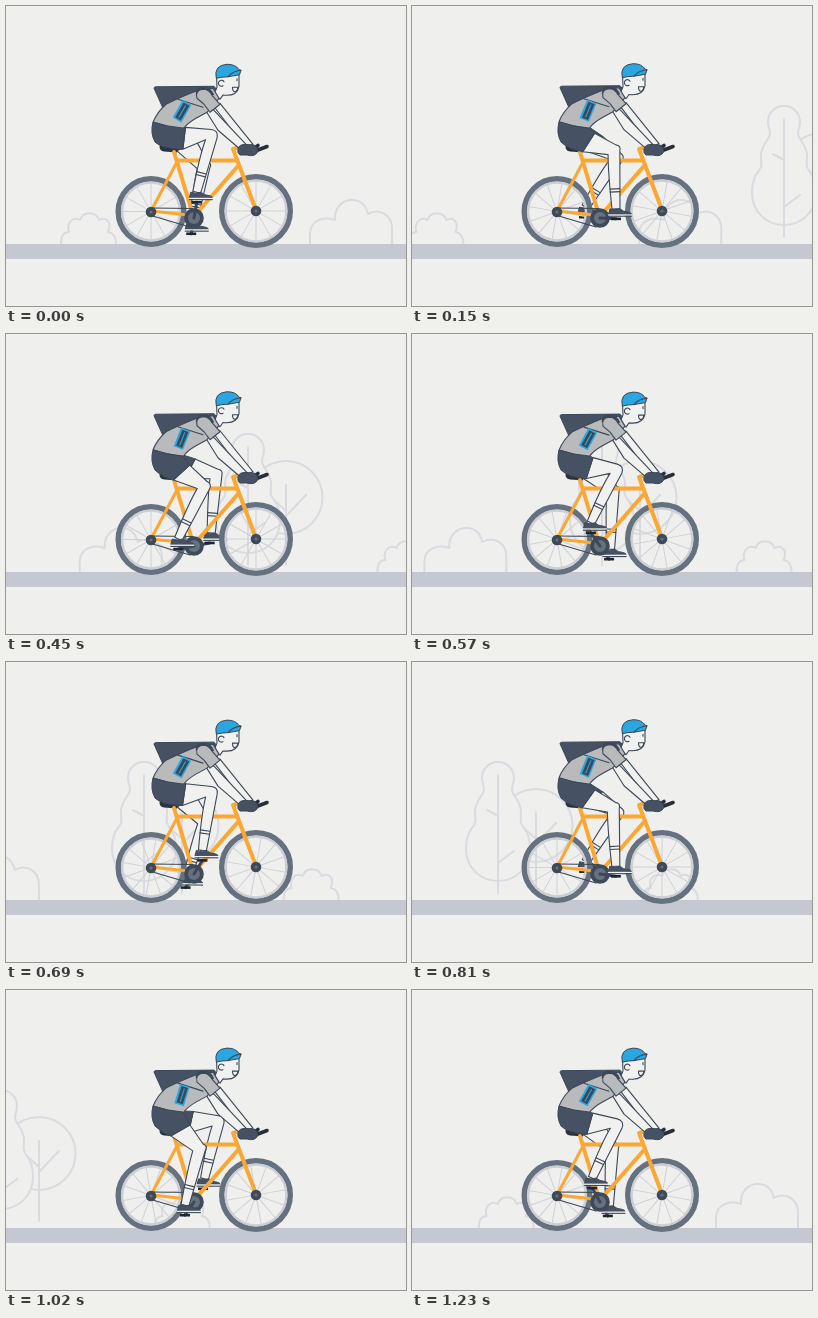
These frames come from a looping animation (400x300 px, 1260 ms). An HTML page:

```html
<!DOCTYPE html>
<html lang="en">
<head>
<meta charset="utf-8">
<title>Cyclist</title>
<style>
  html, body { margin: 0; width: 100%; height: 100%; overflow: hidden; background: #efefed; }
  svg { display: block; width: 100vw; height: 100vh; }
  .scene { fill: #efefed; stroke: #dadbe0; stroke-width: 2; stroke-linecap: round; stroke-linejoin: round; }
  .bare { fill: none; }
  .line { fill: none; stroke: #3c4857; stroke-width: 1.1; stroke-linecap: round; stroke-linejoin: round; }
  .skin { fill: #f1f1f0; stroke: #3c4857; stroke-width: 1.1; stroke-linejoin: round; }
  .dark { fill: #465163; stroke: #3c4857; stroke-width: 1; stroke-linejoin: round; }
  .shirt { fill: #b9babc; stroke: #3c4857; stroke-width: 1.1; stroke-linejoin: round; }
  .frame { fill: none; stroke: #fba733; stroke-width: 4; stroke-linecap: round; stroke-linejoin: round; }
  .tire { fill: none; stroke: #66717f; stroke-width: 5.6; }
  .rim { fill: none; stroke: #cbced5; stroke-width: 2.4; }
  .spokes { fill: none; stroke: #cfd1d7; stroke-width: 1; }
  .crank { stroke: #3c4857; stroke-width: 3; stroke-linecap: round; }
</style>
</head>
<body>
<svg viewBox="0 0 400 300">
  <rect width="400" height="300" fill="#efefed"/>

  <g class="scene">
    <g id="trees">
      <circle cx="38" cy="163.5" r="36.5"/>
      <path class="bare" d="M38 151V231M38 182L58 161M38 177L27 167"/>
      <path d="M0 100C10 100 16 108 16 116C16 123 12 126 15 131C18 137 23 141 23 150C23 157 21 160 26 166C31 172 32 180 32 187C32 206 17 219 0 219C-17 219 -32 206 -32 187C-32 180 -31 172 -26 166C-21 160 -23 157 -23 150C-23 141 -18 137 -15 131C-12 126 -16 123 -16 116C-16 108 -10 100 0 100Z"/>
      <path class="bare" d="M0 113V231M0 154L-11 148M0 201L16 189"/>
    </g>
    <path id="bigBush" d="M0 238V228C0 215 12 210 25 214C24 202 32 194 42 194C51 194 56 200 58 208C70 201 82 210 82 222V238"/>
    <path id="smallBush" d="M0 238C0 230 3 226 8 226C5 217 12 210 19 214C22 205 35 205 38 214C46 210 51 217 47 226C54 227 55 233 55 238"/>
  </g>
  <rect y="238" width="400" height="15" fill="#c5c8d1"/>

  <g id="farCrank"></g>
  <g id="farLeg"></g>

  <g id="wheels"></g>

  <path d="M154 138Q152 145 158 145.500L171 146.500L172 140Z" fill="#2b333f"/>
  <g class="frame">
    <path d="M145 205L171 156M145 205L182 209" stroke-width="3"/>
    <path d="M168 146L187 209M172 154.5H231M232 160L190 208M250 204L227 143L236 140.5"/>
  </g>
  <g fill="#3f4a58">
    <circle cx="145" cy="206" r="5.3"/>
    <circle cx="250" cy="205" r="5.3"/>
    <circle cx="188" cy="212" r="9.8"/>
  </g>
  <g fill="#667180">
    <circle cx="145" cy="206" r="1.6"/>
    <circle cx="250" cy="205" r="1.6"/>
    <circle cx="188" cy="212" r="6"/>
  </g>
  <path class="line" d="M145 202L187 202.5M145 209.500L184 221"/>

  <g id="nearCrank"></g>

  <g id="body">
    <path class="dark" d="M148 82Q148 80.500 150 80.500L208 80L213 86L184 100L157 102Z"/>
    <path class="skin" d="M210.500 69L211 81L208 88L214 93L217 88.800Q231 90.500 233 80V66Z"/>
    <path class="line" d="M218 75.500A3 3 0 1 0 217 79.500M226.500 81H231.800Q231.500 85.500 228.500 85.500Q226.500 85 226.500 81M231 72.500V74.500"/>
    <path d="M210.300 72Q207.500 59 221 58Q230 58 233 63.500L235 64L233.500 68.500L222 70.500Q216 70.500 210.300 72Z" fill="#2aa7e1" stroke="#3c4857"/>
    <path class="line" d="M222 70.500Q226 65 235 64"/>
    <path class="skin" d="M207 99L214 97L247 138L239 141Z"/>
    <path class="skin" d="M197 100L208 104L241 139L233 142L212 124Z"/>
    <path class="shirt" d="M147 116Q151 106 160 98Q174 91 192 84L207 82L213 92L201 106L190 112Q181 117 177 123Q162 121 147 116Z"/>
    <path class="line" d="M172 93L197 101"/>
    <path d="M191 88Q191 81.500 198 81.500Q204 82 207 89" fill="none" stroke="#3c4857" stroke-width="2.600"/>
    <path class="shirt" d="M191 92Q189 84 197 83Q203 83 206 89L214 98L204 106L198 98Z"/>
    <g id="pouch">
      <rect x="-5" y="-10" width="10" height="20" fill="#2aa7e1"/>
      <rect x="-3" y="-8.500" width="6.500" height="17" fill="#3c4857"/>
      <path d="M.3 -7V7" stroke="#2aa7e1" stroke-width="1.1"/>
    </g>
  </g>

  <g id="nearLeg"></g>

  <path d="M248 145.500L261 140.500M247 143L252 139.500" stroke="#272e39" stroke-width="3.600" stroke-linecap="round"/>
  <path class="dark" d="M232 143Q233 138 240 138.500L248 139Q253 142 251 147Q248 151 241 149L234 149Q231 147 232 143Z"/>
</svg>

<script>
const STEP = 30, FRAMES = 42;
const THIGH = 51, SHIN = 58, CRANK = 16;
const HUB = [188, 212];
const $ = id => document.getElementById(id);
const rad = deg => deg * Math.PI / 180;
const pt = p => p[0].toFixed(2) + ' ' + p[1].toFixed(2);
const add = (p, v, k) => [p[0] + v[0] * k, p[1] + v[1] * k];
const dir = a => [Math.cos(a), Math.sin(a)];
const normal = u => [u[1], -u[0]];
const shift = (id, x, y = 0) => $(id).setAttribute('transform', `translate(${x} ${y})`);

function wheel(x, y, r) {
  let spokes = '';
  for (let i = 0; i < 12; i++) {
    const u = dir(rad(i * 30));
    spokes += `M${pt(add([0, 0], u, 5))}L${pt(add([0, 0], u, r - 7))}`;
  }
  return `<g transform="translate(${x} ${y})">
    <circle class="tire" r="${r - 2.8}"/><circle class="rim" r="${r - 6.6}"/>
    <path class="spokes" d="${spokes}"/></g>`;
}
$('wheels').innerHTML = wheel(145, 205.5, 35.5) + wheel(250, 205, 37);
const spokes = document.querySelectorAll('.spokes');

function pedalAt(a) {
  return add(HUB, [Math.sin(a), -Math.cos(a)], CRANK);
}

function crank(id, p) {
  $(id).innerHTML = `<path class="crank" d="M${pt(HUB)}L${pt(p)}"/>
    <path d="M${pt(add(p, [-5, 0], 1))}h10" stroke="#20262f" stroke-width="2.6"/>`;
}

// seat: outline of the shorts from the waist round to the hem's lower end
function leg(id, hip, pedal, seat) {
  const ankle = add(pedal, [0, -10], 1);
  const dx = ankle[0] - hip[0], dy = ankle[1] - hip[1], d = Math.hypot(dx, dy);
  const bend = Math.acos((THIGH ** 2 + d * d - SHIN ** 2) / (2 * THIGH * d));
  const lift = Math.atan2(dy, dx) - bend;
  const u1 = dir(lift);
  const knee = add(hip, u1, THIGH);
  const u2 = [(ankle[0] - knee[0]) / SHIN, (ankle[1] - knee[1]) / SHIN];
  const n1 = normal(u1), n2 = normal(u2);
  const sum = [n1[0] + n2[0], n1[1] + n2[1]], len = Math.hypot(...sum);
  const out = [sum[0] / len, sum[1] / len];

  // the hem turns further than the thigh
  const hem = add(hip, dir(rad(12) + 0.58 * lift), 25);
  const edge = normal(dir(1.5 * lift));
  const top = add(hem, edge, 11), low = add(hem, edge, -11);
  const calf = add(add(knee, u2, 22), n2, -6.2);
  const skin = `M${pt(top)}L${pt(add(knee, n1, 6.5))}Q${pt(add(knee, out, 9.5))} ${pt(add(knee, n2, 6.5))}` +
    `L${pt(add(ankle, n2, 4))}L${pt(add(ankle, n2, -4))}Q${pt(calf)} ${pt(add(knee, out, -6.5))}L${pt(low)}Z`;

  const sock = [17, 20].map(k => {
    const c = add(ankle, u2, -k);
    return `M${pt(add(c, n2, 4.6))}L${pt(add(c, n2, -5))}`;
  }).join('');

  $(id).innerHTML = `<path class="skin" d="${skin}"/><path class="line" d="${sock}"/>
    <path class="dark" d="${seat} ${pt(low)}L${pt(top)}Z"/>
    <g transform="translate(${pt(pedal)})">
      <path class="dark" d="M-7.500 -4.500L-6 -10Q-1 -8 4 -10Q7 -7 13 -6.500Q15.500 -6 15.500 -4.500Z"/>
      <path d="M-8 -3.800H16" stroke="#f4f4f4" stroke-width="1.300"/>
      <path d="M-8 -2.600H16" stroke="#3c4857" stroke-width="1.100"/>
    </g>`;
}

function draw(n) {
  shift('trees', 437 - 13 * n);
  shift('bigBush', 304 - 15.35 * (n > 28 ? n - 41 : n));
  shift('smallBush', 55 - 11.72 * (n > 11 ? n - FRAMES : n));

  const a = rad(10 + 16.6 * n);
  const near = pedalAt(a), far = pedalAt(a + Math.PI);
  crank('farCrank', far);
  crank('nearCrank', near);
  leg('farLeg', [161, 125], add(far, [1.5, 0], 1), 'M177 121L162 119L158 138L');
  leg('nearLeg', [154, 126], near, 'M177 122Q162 121 147 116Q144 127 149 136Q156 143');

  spokes.forEach(s => s.setAttribute('transform', `rotate(${20 * n})`));
  shift('body', 0, 0.3 * Math.cos(2 * a));
  $('pouch').setAttribute('transform', `translate(176 105) rotate(${23 + 7 * Math.cos(a)})`);
}

const start = performance.now();
function tick() {
  draw(Math.floor((performance.now() - start) / STEP) % FRAMES);
  requestAnimationFrame(tick);
}
tick();
</script>
</body>
</html>
```
